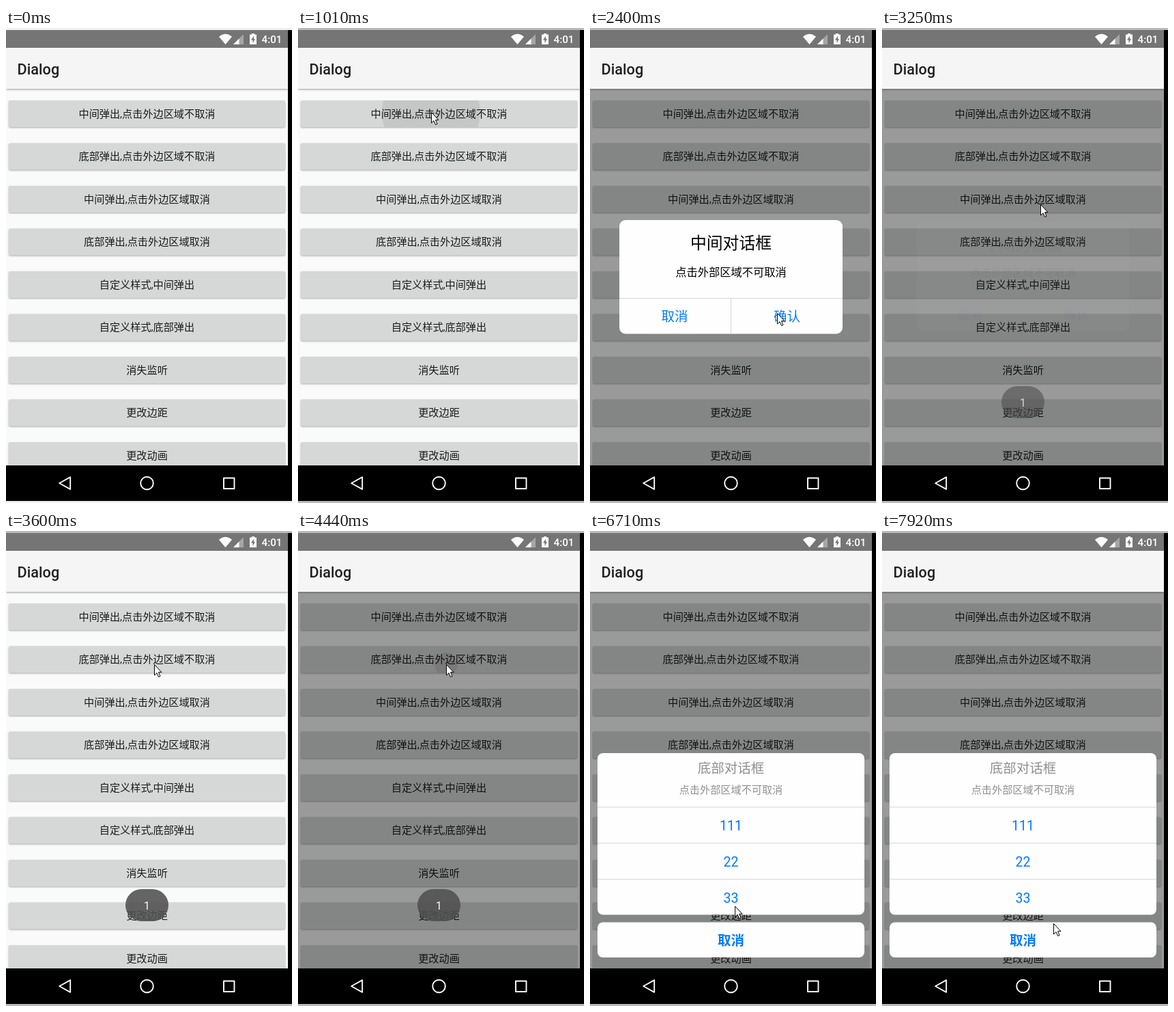
Write an HTML page that moves like this. It is 419x695 px and loops after 8 s.

```html
<!DOCTYPE html>
<html lang="zh-CN">
<head>
<meta charset="utf-8">
<title>Dialog</title>
<style>
  html, body { margin: 0; width: 100%; height: 100%; overflow: hidden; background: #000; }
  svg { display: block; width: 419px; height: 695px; }
  text { font-family: Roboto, "Noto Sans CJK SC", "Noto Sans CJK", sans-serif; text-anchor: middle; }
  .btn { fill: #d6d7d7; filter: drop-shadow(0 1px 1px rgba(0,0,0,.32)); }
  .bar { fill: #f5f5f5; filter: drop-shadow(0 1px 1.5px rgba(0,0,0,.4)); }
  .panel { fill: #fefefe; }
  .rule { stroke: #d4d4d4; stroke-width: 1; }
  .icon { fill: none; stroke: #fff; stroke-width: 1.9; stroke-linejoin: round; }
</style>
</head>
<body>
<svg viewBox="0 0 419 695">
  <defs>
    <clipPath id="content"><rect y="89" width="413" height="551"/></clipPath>
    <clipPath id="pressed"><rect id="pressedBox" x="4" width="405" height="39" rx="2"/></clipPath>
  </defs>
  <rect id="edge" width="419" height="695"/>
  <rect y="3" width="419" height="689"/>
  <g clip-path="url(#content)">
    <rect y="89" width="413" height="551" fill="#fafafa"/>
    <g id="buttons"></g>
    <g clip-path="url(#pressed)"><circle id="ripple"/></g>
    <g id="labels"></g>
    <rect id="dim" y="89" width="413" height="551"/>
    <g id="center">
      <rect class="panel" x="43" y="281" width="327" height="166.5" rx="9"/>
      <path class="rule" d="M43 395.5H370M206.5 395.5V447"/>
    </g>
    <g id="sheet">
      <rect class="panel" x="11" y="325" width="391" height="236.5" rx="8"/>
      <path class="rule" d="M11 404H402M11 456.8H402M11 509.6H402"/>
      <rect class="panel" x="11" y="572.5" width="391" height="51.5" rx="8"/>
    </g>
    <g id="toast">
      <rect x="175" y="524" width="63" height="47" rx="23.5" fill="#505050" fill-opacity=".88"/>
    </g>
  </g>
  <rect class="bar" y="29" width="413" height="60"/>
  <rect y="3" width="413" height="26" fill="#757575"/>
  <g id="chrome">
    <path fill="#fff" d="M312 12.7Q321.5 5 331 12.7L321.5 24Z"/>
    <path fill="#fff" fill-opacity=".35" d="M333 24L348 9V24Z"/>
    <path fill="#fff" d="M333 24L341.5 15.5V24Z"/>
    <path fill="#fff" d="M360 8h4v1.6h3V24h-10V9.6h3Z"/>
    <path fill="#757575" d="M363 11.5L359 17.5h2.5V22L365 16h-2Z"/>
    <path class="icon" d="M94.2 657.2V674.8L78.2 666Z"/>
    <circle class="icon" cx="206.5" cy="666" r="9.3"/>
    <rect class="icon" x="319" y="658.5" width="15.5" height="15.5"/>
  </g>
  <path id="cursor" fill="#fff" stroke="#000" stroke-width="1" stroke-linejoin="round"
    d="M.5.5V16L4 12.7L6.6 18.5L9 17.5L6.5 11.7H11Z"/>
</svg>
<script>
const $ = id => document.getElementById(id);
const NS = 'http://www.w3.org/2000/svg';
const LOOP = 8000, STEP = 170, MID = 206.5, BLUE = '#007aff';

function set(el, attrs) {
  for (const k in attrs) el.setAttribute(k, attrs[k]);
}

function add(parent, tag, attrs, body = '') {
  const el = document.createElementNS(NS, tag);
  set(el, attrs);
  el.textContent = body;
  $(parent).append(el);
}

// Text centred on (x, y); rise is half the glyph height in em.
function label(parent, body, x, y, size, fill, rise = .38, weight = 400) {
  add(parent, 'text', { x, y: y + size * rise, 'font-size': size, fill, 'font-weight': weight }, body);
}

const rowY = i => 106 + i * 62.5;
[
  '中间弹出,点击外边区域不取消', '底部弹出,点击外边区域不取消',
  '中间弹出,点击外边区域取消', '底部弹出,点击外边区域取消',
  '自定义样式,中间弹出', '自定义样式,底部弹出',
  '消失监听', '更改边距', '更改动画'
].forEach((name, i) => {
  add('buttons', 'rect', { class: 'btn', x: 4, y: rowY(i), width: 405, height: 39, rx: 2 });
  label('labels', name, MID, Math.floor(rowY(i)) + 19.3, 15.17, '#1c1c1c');
});

label('center', '中间对话框', MID, 314, 23.8, '#000');
label('center', '点击外部区域不可取消', MID, 357.3, 16.25, '#000');
label('center', '取消', 124, 422, 19.5, BLUE);
label('center', '确认', 288.5, 422, 19.5, BLUE);

label('sheet', '底部对话框', MID, 347, 19.5, '#8f8f8f');
label('sheet', '点击外部区域不可取消', MID, 378.3, 15.17, '#8f8f8f');
['111', '22', '33'].forEach((s, i) => label('sheet', s, MID, 431 + i * 52.8, 19.5, BLUE, .355));
label('sheet', '取消', MID, 598.5, 19.5, BLUE, .38, 700);
label('toast', '1', MID, 548, 15.6, '#fff', .355);

label('chrome', 'Dialog', 47.4, 60.3, 21.7, '#212121', .355, 500);
label('chrome', '4:01', 389.5, 16.5, 15.17, '#fff', .355, 500);

// The screen refreshes every STEP within bursts: start, number of refreshes.
const bursts = [[0, 5], [1010, 1], [1360, 7], [3080, 4], [4440, 3], [5150, 7], [6710, 6], [7750, 2]];

function refreshed(time) {
  const [from, count] = bursts.filter(b => b[0] <= time).pop();
  return from + STEP * Math.min(count - 1, Math.floor((time - from) / STEP));
}

// Cursor glides: start, end, x, y, sideways bend.
const glides = [
  [170, 680, 195, 123, -45],
  [1700, 2380, 274, 417, 0],
  [3080, 3250, 232, 258, 0],
  [3250, 3590, 217, 195, 0],
  [4780, 5320, 236, 315, 0],
  [5320, 6170, 268, 592, 0],
  [6540, 7560, 246, 450, -60],
  [7560, 7920, 251, 574, 0]
];

const ramp = (t, from, to) => Math.min(1, Math.max(0, (t - from) / (to - from)));
const easeOut = k => 1 - (1 - k) ** 2;

function cursorAt(t) {
  let x = 232, y = 383;
  for (const [from, to, gx, gy, bend] of glides) {
    const k = easeOut(ramp(t, from, to));
    x += (gx - x) * k + bend * Math.sin(Math.PI * k);
    y += (gy - y) * k;
  }
  return [x, y];
}

const taps = [{ time: 840, row: 0, cx: 195, cy: 123 }, { time: 4400, row: 1, cx: 217, cy: 195 }];

function draw(time) {
  const t = refreshed(time);
  const [x, y] = cursorAt(t);
  const dim = ramp(t, 1190, 1360) - ramp(t, 3250, 3590) + ramp(t, 4270, 4440);
  const show = ramp(t, 1230, 1700) - ramp(t, 3080, 3254);
  const slide = 316 * (1 - easeOut(ramp(t, 4440, 4780)));
  const toast = ramp(t, 3080, 3325) - ramp(t, 5150, 5470);
  const { time: tapped, row, cx, cy } = taps[t < 3600 ? 0 : 1];

  set($('cursor'), { transform: `translate(${x} ${y})`, opacity: t < 170 ? 0 : 1 });
  set($('dim'), { opacity: .385 * dim });
  set($('center'), {
    opacity: show,
    transform: `translate(206.5 364.2) scale(${.95 + .05 * show}) translate(-206.5 -364.2)`
  });
  set($('sheet'), { transform: `translate(0 ${slide})` });
  set($('toast'), { opacity: toast });
  set($('pressedBox'), { y: rowY(row) });
  set($('ripple'), {
    cx, cy,
    r: 220 * ramp(t, tapped, tapped + 520),
    opacity: .08 * (1 - ramp(t, tapped + 300, tapped + 850))
  });
  set($('edge'), { fill: t < 1010 ? '#eef0ee' : '#bababa' });
}

const start = performance.now();
function loop() {
  draw((performance.now() - start) % LOOP);
  requestAnimationFrame(loop);
}
loop();
</script>
</body>
</html>
```
